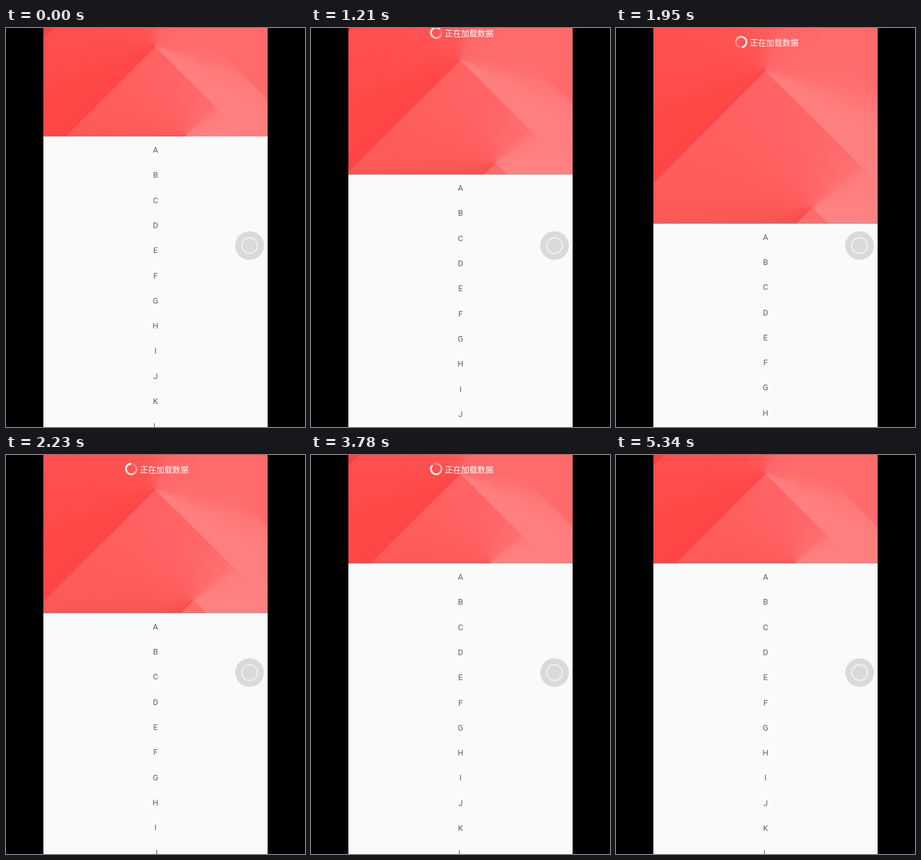
Write an HTML page with a canvas that moves like this. It is 480x640 px and loops after 5.44 s.

```html
<!DOCTYPE html>
<html lang="zh">
<head>
<meta charset="utf-8">
<style>
  html, body { margin: 0; width: 100%; height: 100%; overflow: hidden; background: #000; }
  canvas { display: block; }
</style>
</head>
<body>
<canvas id="stage" width="480" height="640"></canvas>
<script>
const ctx = document.getElementById('stage').getContext('2d');
const LOOP = 5440, LEFT = 60, WIDTH = 360, CENTER = 240;
const REST = 174, IMAGE_MIN = WIDTH * 9 / 16;
const LOADER_Y = 23, LOADER_HIDDEN = -14;

// Header height while pulled and released: [time, height, slope]
const PULL = [
  [520, REST, 0], [1210, 235, .15], [1650, 307, .15],
  [1850, 320, 0], [2230, 254, -.26], [2640, REST, 0]
];

function headerHeight(t) {
  const i = PULL.findIndex(p => t < p[0]);
  if (i < 1) return REST;
  const [t0, h0, m0] = PULL[i - 1], [t1, h1, m1] = PULL[i];
  const d = t1 - t0, u = (t - t0) / d, v = 1 - u;
  return h0 * v * v * (1 + 2 * u) + h1 * u * u * (3 - 2 * u)
    + d * u * v * (m0 * v - m1 * u);
}

function loaderY(t, height) {
  if (t < 1850) return Math.min(LOADER_Y, height - REST - 53);
  const u = Math.min(1, Math.max(0, (t - 4360) / 400));
  return LOADER_Y + (LOADER_HIDDEN - LOADER_Y) * (1 - (1 - u) ** 2);
}

function conic(x, y, stops, start = 0) {
  const gradient = ctx.createConicGradient(start, x, y);
  stops.forEach(([at, color]) => gradient.addColorStop(at, color));
  return gradient;
}

function polygon(fill, ...points) {
  ctx.beginPath();
  points.forEach(([x, y]) => ctx.lineTo(x, y));
  ctx.fillStyle = fill;
  ctx.fill();
}

// The picture is one unit high, centred on x = 0, and covers the header.
function drawHeader(height) {
  const scale = Math.max(height, IMAGE_MIN), edge = 8 / 9;
  const apex = [0, .219], fold = [.241, .918];
  ctx.save();
  ctx.beginPath();
  ctx.rect(LEFT, 0, WIDTH, height);
  ctx.clip();
  ctx.translate(CENTER, (height - scale) / 2);
  ctx.scale(scale, scale);

  polygon(conic(...apex, [
    [0, '#ff6c6c'], [.03, '#ff7070'], [.07, '#ff7c7c'], [.125, '#ff8080'],
    [.375, '#ff4646'], [.45, '#ff4a4a'], [.55, '#ff5050'],
    [.65, '#ff5555'], [.75, '#fb5c5c'], [.82, '#ff6666'], [1, '#ff6c6c']
  ]), [-edge, 0], [edge, 0], [edge, 1], [-edge, 1]);
  polygon('#ff6b6b', [.25, 0], [edge, 0], [edge, edge - .25]);
  polygon('#f84040', [-edge, 0], [-.735, 0], [-edge, edge - .735]);
  polygon(conic(...fold, [
    [0, '#ff8181'], [.125, '#ff8484'], [.125, '#ff6c6c'], [.375, '#ff6c6c'],
    [.375, '#fa4c4c'], [.47, '#fb5555'], [.52, '#fd5b5b'], [.61, '#fe5f5f'],
    [.71, '#ff6464'], [.8, '#ff6969'], [.87, '#ff6e6e'],
    [.91, '#ff7c7c'], [1, '#ff8181']
  ]), apex, [edge, apex[1] + edge], [-edge, apex[1] + edge]);
  ctx.restore();
}

function ring(x, y, radius, width, color) {
  ctx.beginPath();
  ctx.arc(x, y, radius, 0, 2 * Math.PI);
  ctx.lineWidth = width;
  ctx.strokeStyle = color;
  ctx.stroke();
}

function drawLoader(t, y) {
  if (y <= LOADER_HIDDEN) return;
  const turn = ((t - 1650) / 540 - .32) * 2 * Math.PI;
  ring(201, y - .5, 8.5, 3, conic(201, y - .5, [
    [0, 'rgba(255,255,255,.05)'], [.3, 'rgba(255,255,255,.5)'],
    [.7, 'rgba(255,255,255,.9)'], [1, '#fff']
  ], turn));
  ctx.font = '13px "Noto Sans CJK SC", "Noto Sans CJK", sans-serif';
  ctx.textAlign = 'left';
  ctx.fillStyle = '#fff';
  ctx.fillText('正在加载数据', 215, y + 5);
}

function drawList(top) {
  ctx.fillStyle = '#fafafa';
  ctx.fillRect(LEFT, top, WIDTH, 640 - top);
  ctx.font = '13px Roboto, sans-serif';
  ctx.textAlign = 'center';
  ctx.fillStyle = '#626262';
  [...'ABCDEFGHIJKL'].forEach((letter, i) =>
    ctx.fillText(letter, CENTER, top + 26 + i * 40.3));
}

function drawFloatingButton() {
  ctx.beginPath();
  ctx.arc(391, 349, 23, 0, 2 * Math.PI);
  ctx.fillStyle = '#dadada';
  ctx.fill();
  ring(391, 349, 12.5, 1.8, '#f4f4f4');
}

function frame(now) {
  const t = now % LOOP, height = headerHeight(t);
  ctx.fillStyle = '#000';
  ctx.fillRect(0, 0, 480, 640);
  drawHeader(height);
  drawList(height);
  drawLoader(t, loaderY(t, height));
  drawFloatingButton();
  requestAnimationFrame(frame);
}
requestAnimationFrame(frame);
</script>
</body>
</html>
```
